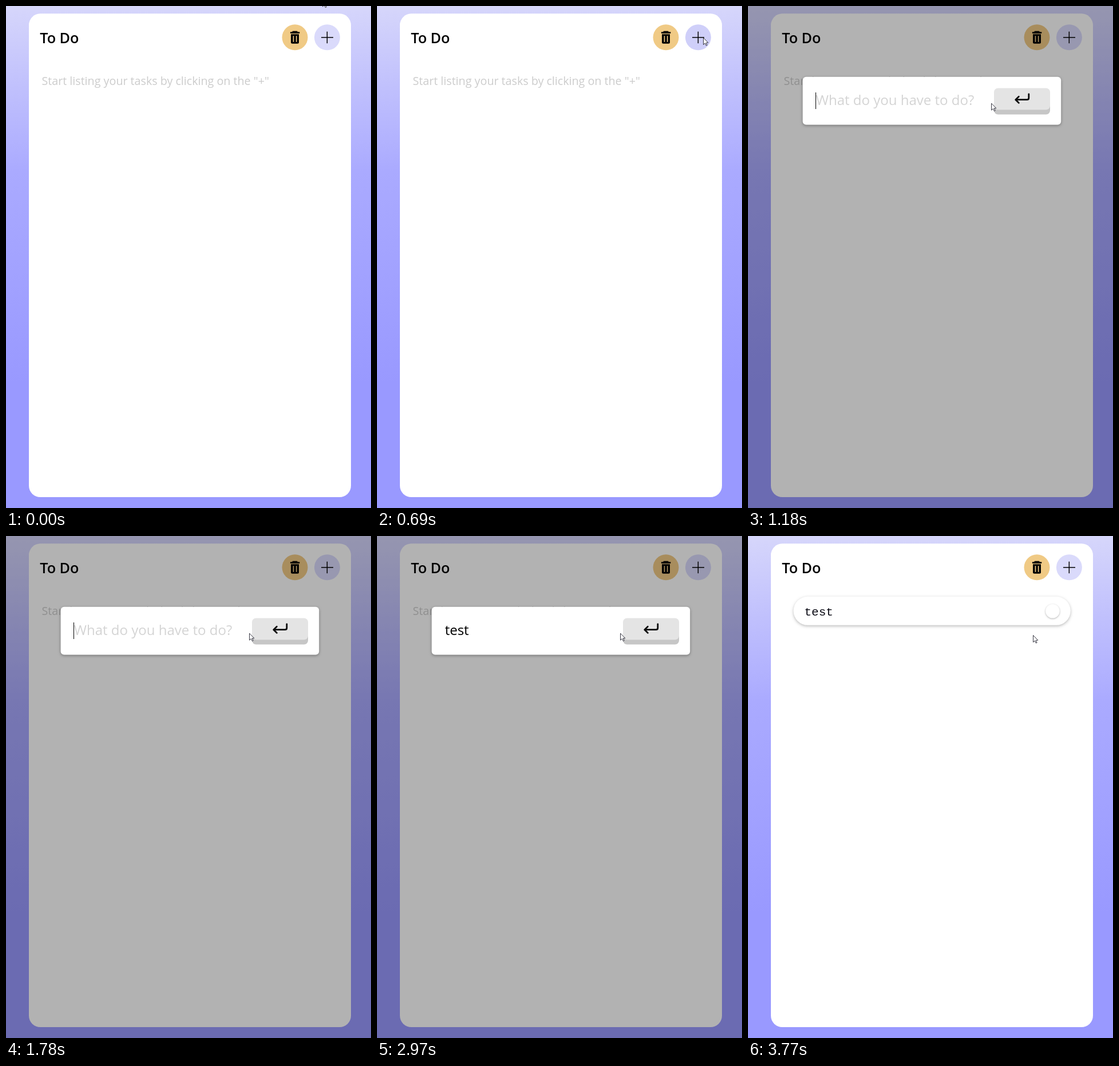
Animation of 638 by 877 pixels, one loop 4230 ms. Source, as an HTML page with a canvas:

```html
<!DOCTYPE html>
<html lang="en">
<head>
<meta charset="utf-8">
<title>To Do</title>
<style>
  html, body { margin: 0; width: 100%; height: 100%; overflow: hidden; background: #99f; }
  canvas { display: block; }
</style>
</head>
<body>
<canvas id="stage" width="638" height="877"></canvas>
<script>
const W = 638, H = 877, LOOP = 4230;
const HOVER = 690, OPEN = 760, CLICK = 3370, DONE = 3770;
const BLINK = 510;
const SANS = '"Open Sans", "Noto Sans", sans-serif';
const MONO = '"Liberation Mono", "DejaVu Sans Mono", monospace';
const TASK = 'test', KEYS = [1850, 1920, 2120, 2380];
const c = document.getElementById('stage').getContext('2d');

const START = { x: 553.5, y: -11 };
const MOVES = [
  { from: 130, to: 490, x: 570.5, y: 55.5 },
  { from: 830, to: 1180, x: 425.5, y: 170 },
  { from: 2980, to: 3300, x: 498.5, y: 173.5 }
];
const ARROW = new Path2D('M0 0V12L2.8 9.5L4.8 13.6L6.6 12.8L4.7 8.8L8.3 8.6Z');
const RETURN = new Path2D('M490.8 153.8V160.5Q490.8 163.7 487.6 163.7H468M473.3 158.2L467.7 163.7L473.3 169.2');

const ease = k => k * k * (3 - 2 * k);

// The pointer advances in six jumps per move, the first one at once.
function pointerAt(t) {
  let { x, y } = START;
  for (const m of MOVES) {
    if (t < m.from) break;
    const jump = Math.floor((t - m.from) / (m.to - m.from) * 5 + 0.001) + 1;
    const k = ease(Math.min(1, jump / 6));
    x += (m.x - x) * k;
    y += (m.y - y) * k;
  }
  return { x, y };
}

function box(x, y, w, h, r, fill) {
  c.beginPath();
  c.roundRect(x, y, w, h, r);
  c.fillStyle = fill;
  c.fill();
}

function disc(x, y, r, fill) {
  c.beginPath();
  c.arc(x, y, r, 0, Math.PI * 2);
  c.fillStyle = fill;
  c.fill();
}

function text(str, x, y, font, fill) {
  c.font = font;
  c.fillStyle = fill;
  c.fillText(str, x, y);
}

function raised(blur, dy, alpha, draw) {
  c.save();
  c.shadowColor = `rgba(0,0,0,${alpha})`;
  c.shadowBlur = blur;
  c.shadowOffsetY = dy;
  draw();
  c.restore();
}

function backdrop() {
  const g = c.createLinearGradient(0, 0, 0, H);
  g.addColorStop(0, '#d6d6fb');
  g.addColorStop(0.33, '#aaaaff');
  g.addColorStop(0.75, '#9999ff');
  c.fillStyle = g;
  c.fillRect(0, 0, W, H);
  box(40, 13.3, 563, 844.7, 20, '#fff');
}

function trash() {
  const amber = '#f0ca85';
  disc(505, 54.8, 22.5, amber);
  box(500.5, 43.8, 9, 3, 1, '#000');
  box(496.8, 45.2, 16.6, 2.8, 1, '#000');
  box(498, 49.2, 14, 16.6, [0, 0, 2.5, 2.5], '#000');
  for (const x of [501.6, 506.8]) box(x, 52, 1.7, 11, 0.8, amber);
}

function plus(hover) {
  disc(561.4, 54.8, 22.5, hover ? '#cfcff9' : '#dadafb');
  c.fillStyle = '#000';
  c.fillRect(551, 54.2, 21, 1.5);
  c.fillRect(560.6, 44.7, 1.5, 20.5);
}

function returnKey(hover, pressed) {
  const dy = pressed ? 2.3 : 0;
  box(430, 152, 98, 37.6, 7, '#c6c6c6');
  box(430, 143.5 + dy, 98, 37.8, 7, hover ? '#dbdbdb' : '#e4e4e4');
  c.save();
  c.translate(0, dy);
  c.strokeStyle = '#0c0c0c';
  c.lineWidth = 2.8;
  c.lineCap = c.lineJoin = 'round';
  c.stroke(RETURN);
  c.restore();
}

function field(t) {
  const typed = KEYS.filter(key => key <= t);
  const value = TASK.slice(0, typed.length);
  const font = '24px ' + SANS;
  if (value) text(value, 118.7, 173, font, '#000');
  else text('What do you have to do?', 118.7, 173, font, '#d4d4d4');

  // Each key press restarts the caret's blink.
  const idle = t - (typed.pop() || OPEN);
  if (t < CLICK && idle % (2 * BLINK) < BLINK) {
    c.fillStyle = '#000';
    c.fillRect(118 + Math.round(c.measureText(value).width), 151, 1, 29);
  }
}

function dialog(t, x) {
  c.fillStyle = 'rgba(0,0,0,0.3)';
  c.fillRect(0, 0, W, H);
  raised(5, 1.5, 0.35, () => box(95.6, 123.8, 451.6, 83.6, 6, '#fff'));
  field(t);
  const pressed = t >= CLICK;
  returnKey(x >= 430, pressed);
  if (pressed) disc(498.3, 173.5, 9.4, 'rgba(238,238,84,0.95)');
}

function task() {
  raised(5, 1.8, 0.27, () => box(79.5, 105.8, 484.3, 50, 25, '#fff'));
  text(TASK, 98.5, 138.5, '21px ' + MONO, '#0a0a14');
  raised(3, 1, 0.3, () => disc(532.4, 131.2, 12.3, '#fff'));
}

function pointer(x, y) {
  c.save();
  c.translate(x, y);
  c.fillStyle = '#fff';
  c.fill(ARROW);
  c.strokeStyle = '#22222e';
  c.lineWidth = 0.9;
  c.stroke(ARROW);
  c.restore();
}

function render(t) {
  const { x, y } = pointerAt(t);
  backdrop();
  text('To Do', 59.2, 64.8, '600 25.2px ' + SANS, '#000');
  trash();
  plus(t >= HOVER && t < MOVES[1].from);
  if (t >= DONE) {
    task();
  } else {
    text('Start listing your tasks by clicking on the "+"', 62.5, 138, '19.7px ' + SANS, '#ccc');
    if (t >= OPEN) dialog(t, x);
  }
  pointer(x, y);
}

function tick() {
  render(performance.now() % LOOP);
  requestAnimationFrame(tick);
}
tick();
</script>
</body>
</html>
```
